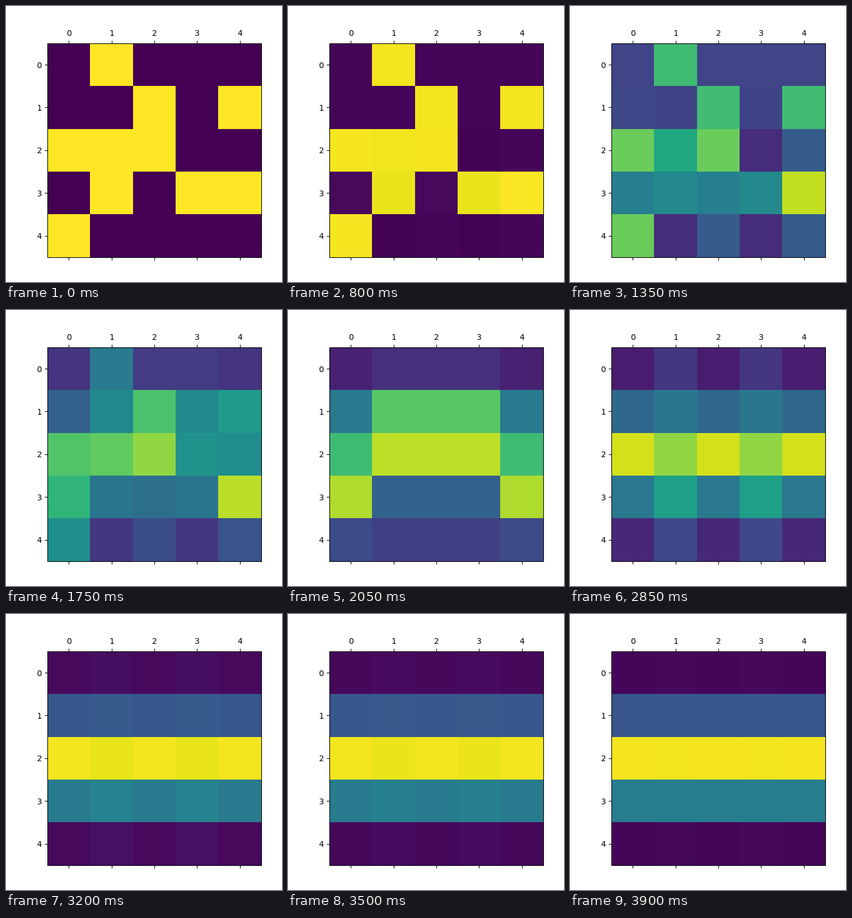
Recreate the animation shown at these times as a matplotlib script. Size 480 px wide and 480 px high, loop 4700 ms.

```python
import numpy as np
import matplotlib.pyplot as plt
from matplotlib.animation import FuncAnimation

TICK = 50     # ms per frame
FRAMES = 94
row, col = np.indices((5, 5))


def bits(text):
    return np.array([int(c) for c in text])


def by_column(mask, on, off):
    """Give each column one of two vertical profiles."""
    return np.where(bits(mask), np.c_[on], np.c_[off])


def blend(a, b, t):
    return a + (b - a) * t


# The cells fade, mix along the columns, then settle into even bands.
start = bits("0100000101111000101110000").reshape(5, 5)
ripple = 0.22 * (-1.0) ** col * np.exp(-(row - 3.0) ** 2)
faded = blend(0.21, 0.69, start) + ripple
mixed = by_column("01110", on=[.14, .74, .90, .31, .19],
                  off=[.09, .41, .69, .88, .23])
banded = by_column("01010", on=[.245, .47, .74, .65, .345],
                   off=[.12, .38, .90, .39, .18])
bands = np.c_[[.015, .265, .99, .42, .01]]

states = [start, faded, mixed, banded,
          blend(bands, banded, 0.1), blend(bands, banded, 0.03)]
knots = [15, 27, 41, 52, 64, 78]

# Evenly spaced ticks that repeat the one before.
holds = set(np.rint(np.linspace(21, 62, 7)).astype(int))


def matrix_at(tick):
    if tick in holds:
        tick -= 1
    pos = np.interp(tick, knots, range(len(knots)))
    k = min(int(pos), len(knots) - 2)
    t = pos - k
    if k == 0:
        t **= 1.15   # gentle departure
    return blend(states[k], states[k + 1], t)


fig = plt.figure(figsize=(4.8, 4.8), dpi=100)
ax = fig.add_axes([0.15, 0.09, 0.775, 0.775])
image = ax.matshow(matrix_at(0), cmap="viridis", vmin=0, vmax=1)


def update(tick):
    image.set_data(matrix_at(tick))
    return [image]


anim = FuncAnimation(fig, update, frames=FRAMES, interval=TICK,
                     repeat=True, repeat_delay=0)
plt.show()
```
